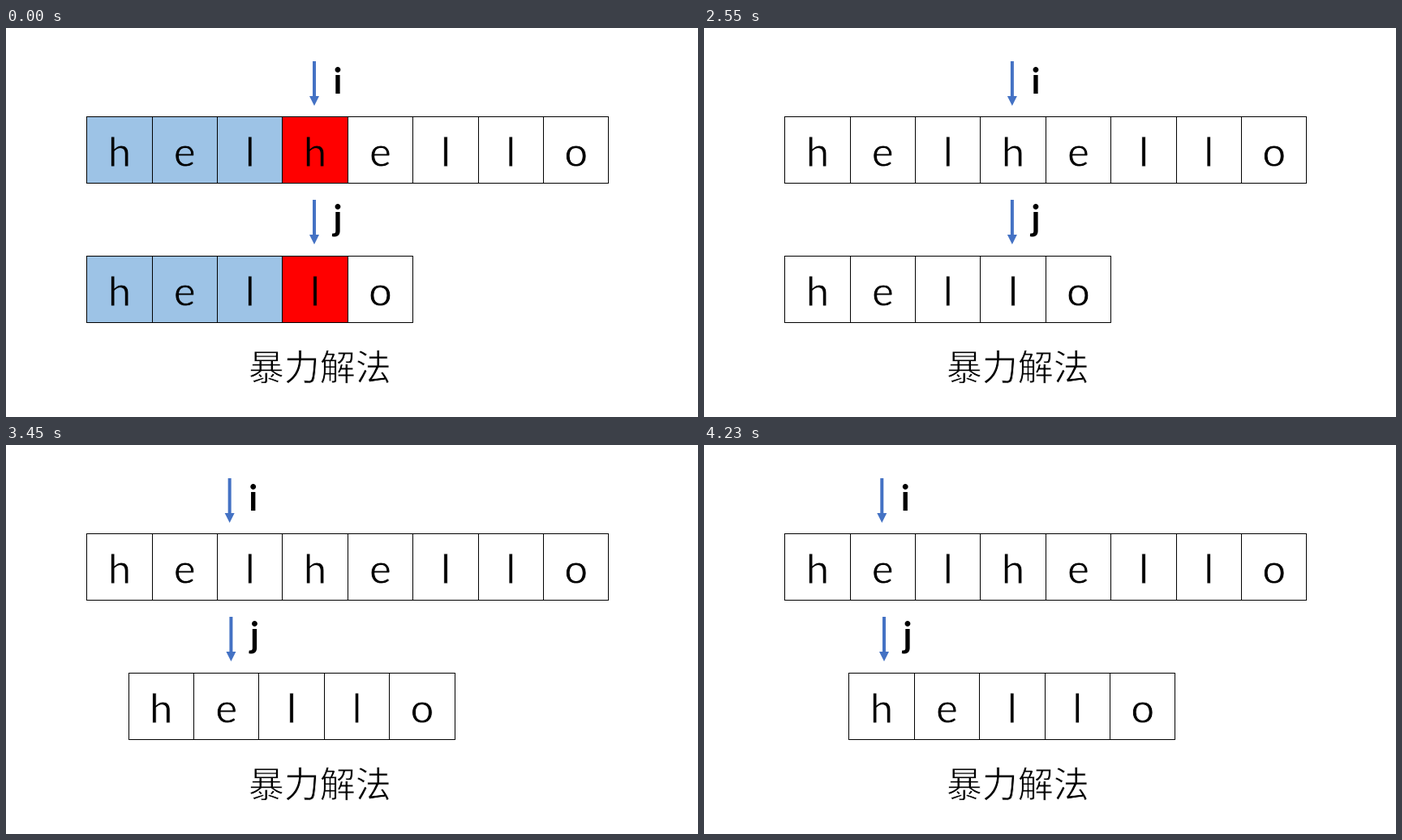
Recreate the animation shown at these times as an HTML page. Size 853 px wide and 480 px high, loop 6240 ms.

```html
<!DOCTYPE html>
<html lang="zh">
<head>
<meta charset="utf-8">
<title>暴力解法</title>
<style>
html, body { margin: 0; width: 100%; height: 100%; overflow: hidden; background: #fff; }
svg { display: block; }
text { text-anchor: middle; fill: #000; }
.cell { fill: currentColor; stroke: #000; stroke-width: 1; shape-rendering: crispEdges; }
/* A background-coloured outline thins the strokes of the type. */
.letter { font: 51px Lato, sans-serif; stroke: currentColor; stroke-width: .8; }
.caption { font: 300 44px "Noto Sans CJK SC", "Noto Sans CJK", sans-serif; stroke: #fff; stroke-width: .8; }
.label { font: bold 43px Lato, sans-serif; }
.arrow { fill: #4472c4; }
</style>
</head>
<body>
<svg id="stage" width="853" height="480" viewBox="0 0 853 480"></svg>
<script>
const LOOP = 6240, CHANGE = 2010, LAST_CHANGE = 4230, STEP = 60;
const LEFT = 99.7, CELL_W = 80.4, CELL_H = 82.2;
const BLUE = [157, 195, 230], RED = [255, 0, 0], WHITE = [255, 255, 255];
const stage = document.getElementById("stage");

function add(parent, tag, attrs, text = "") {
  const node = document.createElementNS("http://www.w3.org/2000/svg", tag);
  for (const key in attrs) node.setAttribute(key, attrs[key]);
  node.textContent = text;
  return parent.appendChild(node);
}

const cells = [];

function addRow(word, top) {
  const row = add(stage, "g", {});
  [...word].forEach((letter, i) => {
    const x = LEFT + i * CELL_W;
    const node = add(row, "g", {});
    add(node, "rect", { class: "cell", x, y: top, width: CELL_W, height: CELL_H });
    add(node, "text", { class: "letter", x: x + CELL_W / 2, y: top + 61.3 }, letter);
    cells.push({ node, color: i < 3 ? BLUE : i === 3 ? RED : WHITE });
  });
  return row;
}

function addPointer(name, top, baseline) {
  const pointer = add(stage, "g", {});
  add(pointer, "path", {
    class: "arrow",
    d: `M378 ${top}h4v43h4l-6 12l-6 -12h4z`
  });
  add(pointer, "text", { class: "label", x: 409, y: baseline }, name);
  return pointer;
}

addRow("helhello", 109.6);
const pattern = addRow("hello", 281.4);
const pointerI = addPointer("i", 41, 81);
const pointerJ = addPointer("j", 212, 249.5);
add(stage, "text", { class: "caption", x: 386.7, y: 434.7 }, "暴力解法");

const clamp = v => Math.min(1, Math.max(0, v));
const ease = u => u < 0.5 ? 2 * u * u : 1 - 2 * (1 - u) ** 2;
const shift = (node, dx) => node.setAttribute("transform", `translate(${dx.toFixed(2)} 0)`);

function draw(time) {
  const t = time < CHANGE ? 0
    : Math.min(LAST_CHANGE, CHANGE + Math.floor((time - CHANGE) / STEP) * STEP);
  const fade = clamp((t - 1948) / 463);
  const move = ease(clamp((t - 2520) / 1600));

  for (const { node, color } of cells) {
    const mixed = color.map(c => Math.round(c + (255 - c) * fade));
    node.setAttribute("color", `rgb(${mixed})`);
  }
  shift(pattern, 79.1 * move);
  shift(pointerI, -160.7 * move);
  shift(pointerJ, -158 * move);
}

const start = performance.now();
function tick() {
  draw((performance.now() - start) % LOOP);
  requestAnimationFrame(tick);
}
tick();
</script>
</body>
</html>
```
